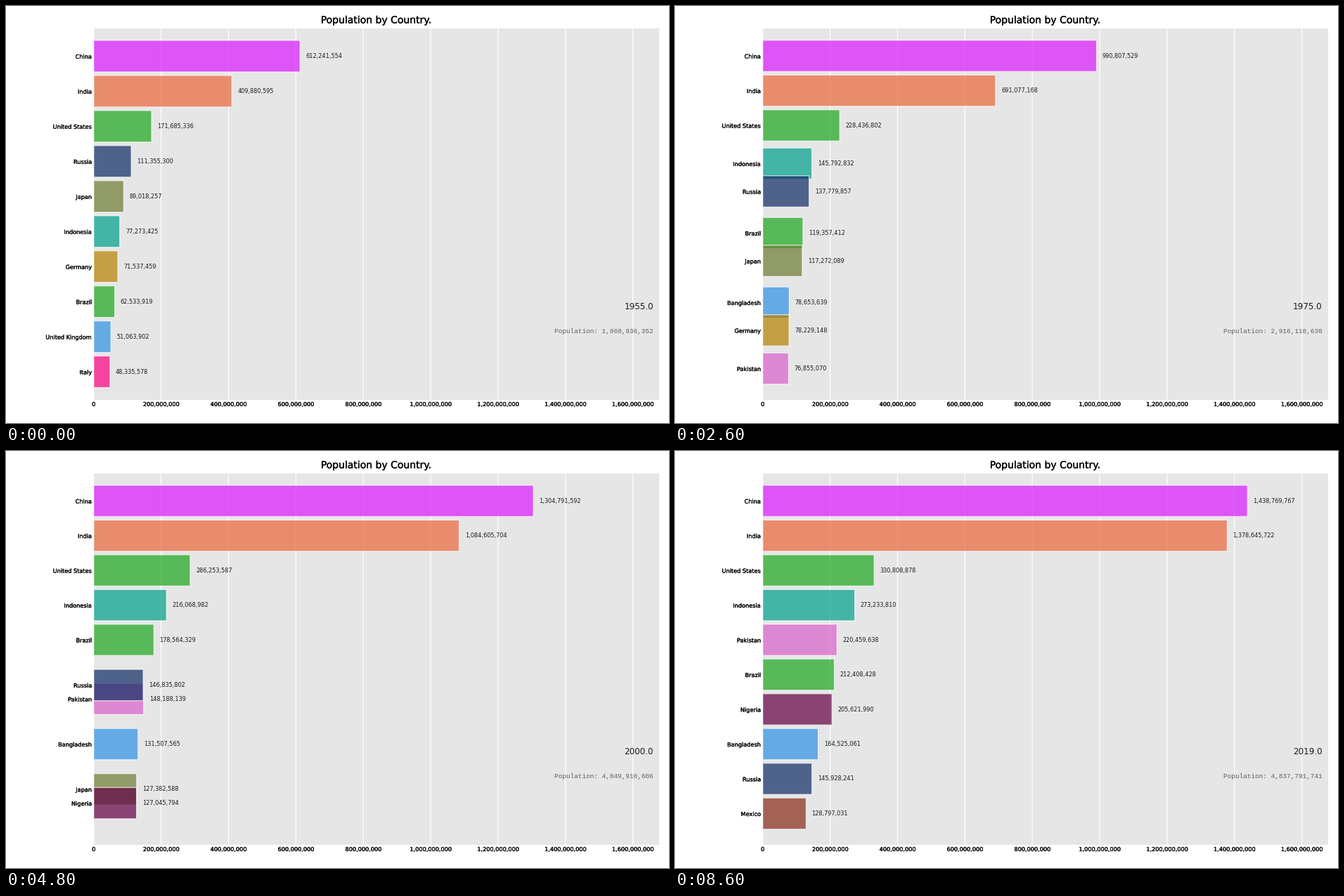
These frames come from a looping animation (943 px wide and 594 px high, 8700 ms). A matplotlib script:

```python
import matplotlib.pyplot as plt
import numpy as np
from matplotlib import patheffects
from matplotlib.animation import FuncAnimation

W, H, DPI = 943, 594, 64
PT = 72 / DPI                        # points per pixel
LEFT, RIGHT, TOP, BOTTOM = 124.75, 928.75, 31.5, 561
FRAMES, INTERVAL, STEPS = 87, 100, 10
TOP_N, BAR_H, X_MAX = 10, 0.9, 1677.6e6

PALETTE = ["#2E91E5", "#1CA71C", "#DA16FF", "#B68100", "#EB663B", "#00A08B",
           "#FC0080", "#6C7C32", "#862A16", "#620042", "#DA60CA", "#0D2A63"]

# Each country follows a smooth curve through its millions in these years
KEY_YEARS = np.array([1955, 1965, 1980, 2000, 2019.9])
KEYS = {
    "Bangladesh": (42.086301, 55.385, 79.639, 127.658, 164.525061),
    "Brazil": (62.533919, 83.374, 120.694, 174.790, 212.408428),
    "China": (612.241554, 724.219, 1000.089, 1290.551, 1438.769767),
    "Germany": (71.537459, 75.991, 78.283, 81.401, 83.757252),
    "India": (409.880595, 499.123, 698.953, 1056.576, 1378.645722),
    "Indonesia": (77.273425, 100.267, 147.448, 211.514, 273.233810),
    "Italy": (48.335578, 51.987, 56.328, 56.692, 60.471078),
    "Japan": (89.018257, 98.447, 117.817, 127.524, 126.514845),
    "Mexico": (32.351133, 43.600, 67.705, 98.900, 128.797031),
    "Nigeria": (41.085563, 50.128, 73.424, 122.284, 205.621990),
    "Pakistan": (40.488030, 50.918, 78.054, 142.344, 220.459638),
    "Russia": (111.355300, 126.484, 138.053, 146.405, 145.928241),
    "United Kingdom": (51.063902, 54.303, 56.308, 58.923, 67.850000),
    "United States": (171.685336, 199.734, 229.476, 281.711, 330.808878),
}

PERIODS = np.array([*range(1955, 2016, 5), *range(2016, 2021)])
STEP_POS = np.arange((len(PERIODS) - 1) * STEPS + 1) / STEPS
SPAN = np.arange(len(PERIODS))


def scaled(years):
    return (np.asarray(years) - 1955) / 65


curves = np.polyfit(scaled(KEY_YEARS), 1e6 * np.array([*KEYS.values()]).T,
                    len(KEY_YEARS) - 1)


def populations(years):
    return np.array([np.polyval(c, scaled(years)) for c in curves.T]).T


# Ranks are settled once per period and glide linearly in between
ranks = np.argsort(np.argsort(-populations(PERIODS), axis=1), axis=1)
slots = np.clip(TOP_N - ranks, 0, None)
places = np.array([np.interp(STEP_POS, SPAN, s) for s in slots.T]).T
values = populations(np.interp(STEP_POS, SPAN, PERIODS))

# The lower limit only ever widens to take in the lowest bar so far
lowest = np.where(places > 1e-6, places, np.inf).min(axis=1)
floors = np.minimum.accumulate(np.minimum(lowest, 0.2))

plt.rcParams["font.family"] = "DejaVu Sans"
fig = plt.figure(figsize=(W / DPI, H / DPI), dpi=DPI, facecolor="white")
ax = fig.add_axes([LEFT / W, 1 - BOTTOM / H, (RIGHT - LEFT) / W, (BOTTOM - TOP) / H],
                  facecolor="0.9")
ax.set_xlim(0, X_MAX)
ax.set_xticks(np.arange(0, 1.7e9, 2e8))
ax.set_yticks([])
ax.tick_params(length=0, labelbottom=False)
ax.set_axisbelow(True)
ax.grid(axis="x", color="white", lw=1.2 * PT, snap=False)
for spine in ax.spines.values():
    spine.set_visible(False)


def text(x, y, s, px, transform, heavy=False, **kw):
    t = ax.text(x, y, s, fontsize=px * PT, transform=transform, **kw)
    if heavy:
        t.set_path_effects([patheffects.withStroke(linewidth=0.25 * PT,
                                                   foreground="black")])
    return t


def fig_text(x, y, s, px):
    text(x / W, 1 - y / H, s, px, fig.transFigure, heavy=True, ha="center", color="black")


fig_text((LEFT + RIGHT) / 2, 24.5, "Population by Country.", 13.97)
for tick in ax.get_xticks():
    fig_text(LEFT + tick / X_MAX * (RIGHT - LEFT), 570, f"{tick:,.0f}", 8.15)

year_text = text(0.99, 0.25, "", 11.85, ax.transAxes, ha="right", va="center",
                 color="#1a1a1a")
total_text = text(0.99, 0.18, "", 9.4, ax.transAxes, ha="right", color="#606060",
                  family="Liberation Mono")

colors = [PALETTE[i % len(PALETTE)] for i in range(len(KEYS))]
bars = ax.barh(np.zeros(len(KEYS)), 1, BAR_H, alpha=0.7, edgecolor="white",
               linewidth=1.3 * PT, zorder=2, snap=False, color=colors)
name_texts = [text(-2.6 / (RIGHT - LEFT), 0, n, 8.15, ax.get_yaxis_transform(), heavy=True,
                   ha="right", va="center_baseline", color="black") for n in KEYS]
value_texts = [text(0, 0, "", 8.15, ax.transData, va="center", color="#1a1a1a")
               for _ in KEYS]


def draw(frame):
    step = max(0, 2 * frame - 3)
    ax.set_ylim(floors[step], TOP_N + 0.8)
    rows = zip(bars, name_texts, value_texts, values[step], places[step])
    for bar, name, label, value, place in rows:
        for artist in (bar, name, label):
            artist.set_visible(place > 1e-6)
        bar.set_width(value)
        bar.set_y(place - BAR_H / 2)
        name.set_y(place)
        label.set_position((value + 0.01 * X_MAX, place))
        label.set_text(f"{value:,.0f}")
    year_text.set_text(f"{PERIODS[step // STEPS]:.1f}")
    total_text.set_text(f"Population: {values[step].sum():,.0f}")
    return []


anim = FuncAnimation(fig, draw, frames=FRAMES, interval=INTERVAL, init_func=lambda: draw(0),
                     repeat=True, repeat_delay=0, blit=False)
plt.show()
```
